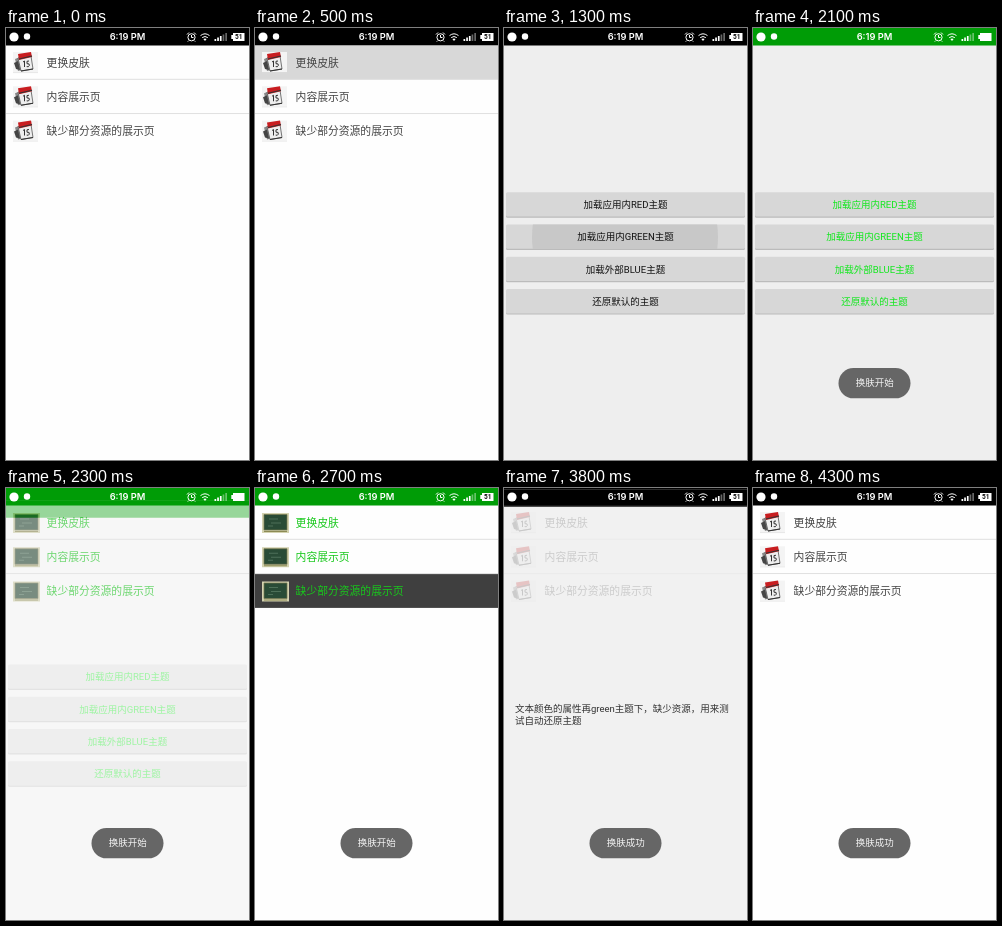
An HTML page for the animation above (4.5 s loop, 243 by 432 pixels).

```html
<!DOCTYPE html>
<html lang="zh-CN">
<head>
<meta charset="utf-8">
<title>换肤演示</title>
<style>
  html, body { margin: 0; width: 100%; height: 100%; overflow: hidden; background: #fff; }
  svg { display: block; width: 100vw; height: 100vh; }
  text { font-family: Roboto, "Noto Sans CJK SC", "Noto Sans CJK", sans-serif; font-size: 9.5px; }
  .mid { text-anchor: middle; }
  .bar { fill: #000; }
  .green .bar { fill: #009c06; }
  #list text { font-size: 10.8px; fill: #444; }
  #list.green text { fill: #18c81c; }
  #buttons text { fill: #111; }
  #buttons.green text { fill: #10e81c; }
  .pressed { fill: #d8d8d8; }
  .green .pressed { fill: #3f3f3f; }
  .board, .green .calendar { display: none; }
  .green .board { display: inline; }
  #clock { font: 600 9.3px Inter, Roboto, sans-serif; fill: #fff; }
  #level { font: 700 6.5px Roboto, sans-serif; fill: #111; }
</style>
</head>
<body>
<svg viewBox="0 0 243 432" preserveAspectRatio="none">
  <defs>
    <g id="calendar">
      <path d="M7 24h25v20H7z" fill="#f4f4f4"/>
      <path d="M7 44.6h25" stroke="#ddd" stroke-width=".7"/>
      <path d="M9 31l5-2 2 13-4 1z" fill="#888"/>
      <path d="M8 35l4-2 2 9-4-1z" fill="#444"/>
      <path d="M12 30l13-2 2 13-12 2z" fill="#eee" stroke="#555" stroke-width=".8"/>
      <path d="M12 26l13-2 1 5-13 3z" fill="#c81d20"/>
      <path d="M13 31l13-3M15 43l12-2" stroke="#333" stroke-width="1.2"/>
      <path d="M17 34l1.5-1v6M23 33l-2 .3v2.4q3-.5 2.3 2-.7 1.6-2.6.9" fill="none" stroke="#333"/>
    </g>
    <g id="board">
      <path d="M7 25h27v20H7z" fill="#d3d2b0"/>
      <path d="M9 26.5h23v15.5H9z" fill="#294b36" stroke="#73764c" stroke-width=".7"/>
      <path d="M14 31h9M16 35h10M13 38h5" stroke="#5d8067" stroke-width=".7"/>
      <path d="M9 43.5h23" stroke="#8d8b55"/>
    </g>
    <clipPath id="button-clip"><rect x="2" y="196.5" width="239" height="24.5" rx="1.5"/></clipPath>
  </defs>

  <g id="list"><rect width="243" height="432" fill="#fefefe"/><rect class="bar" width="243" height="17.5"/></g>
  <g id="buttons"><rect width="243" height="432" fill="#eee"/><rect class="bar" width="243" height="17.5"/></g>
  <g id="content">
    <rect width="243" height="432" fill="#eee"/><rect class="bar" width="243" height="17.5"/>
    <text x="11" y="223">文本颜色的属性再green主题下，缺少资源，用来测</text>
    <text x="11" y="234.3">试自动还原主题</text>
  </g>

  <g id="status" fill="#fff">
    <circle cx="8" cy="9" r="4.6"/>
    <circle cx="21" cy="8.5" r="3.2"/>
    <text id="clock" class="mid" x="121.5" y="12.4">6:19 PM</text>
    <g fill="none" stroke="#fff">
      <circle cx="185.5" cy="9.3" r="3.6"/>
      <path d="M185.5 7v2.5h2M181 6.5l2-2M190 6.5l-2-2M182.8 12.6l-1 1M188.2 12.6l1 1"/>
      <path d="M194.5 7.6q4.5-3.6 9 0M196.2 9.6q2.8-2.2 5.6 0"/>
    </g>
    <path d="M197.4 11q1.6-1.2 3.2 0l-1.6 2z"/>
    <path d="M208.5 11h1.7v2h-1.7zM211.2 9.5h1.7v3.5h-1.7zM213.9 8h1.7v5h-1.7z"/>
    <path d="M216.6 6.4h1.7v6.6h-1.7zM219.3 5h1.7v8h-1.7z" opacity=".4"/>
    <path d="M227 5h11.5v8H227v-2h-1.7V7H227z"/>
    <text id="level" class="mid" x="232.8" y="11.4">51</text>
  </g>

  <g id="toast">
    <rect x="85.5" y="340" width="72" height="30.3" rx="15.1" fill="#666"/>
    <text id="message" class="mid" x="121.8" y="357.8" fill="#f5f5f5"></text>
  </g>
</svg>
<script>
const LOOP = 4500, STEP = 100, SLIDE = 34;
const $ = id => document.getElementById(id);
const between = (t, a, b) => t >= a && t < b;
const clamp = v => Math.max(0, Math.min(1, v));

const rows = ['更换皮肤', '内容展示页', '缺少部分资源的展示页'];
$('list').insertAdjacentHTML('beforeend', rows.map((label, i) => `
  <g transform="translate(0 ${i * 34.25})">
    <rect id="row${i}" class="pressed" y="17.6" width="243" height="33.8"/>
    <use class="calendar" href="#calendar"/><use class="board" href="#board"/>
    <text x="40.6" y="38.5">${label}</text>
    ${i < 2 ? '<path d="M0 51.3h243" stroke="#ddd" stroke-width=".9"/>' : ''}
  </g>`).join(''));

const buttons = ['加载应用内RED主题', '加载应用内GREEN主题', '加载外部BLUE主题', '还原默认的主题'];
const ripple = '<circle id="ripple" cx="121" cy="209" fill="#c8c8c8" clip-path="url(#button-clip)"/>';
$('buttons').insertAdjacentHTML('beforeend', buttons.map((label, i) => {
  const y = 164.2 + i * 32.3;
  return `<rect x="2" y="${y + 1}" width="239" height="24.5" rx="1.5" fill="#bbb"/>
    <rect x="2" y="${y}" width="239" height="24.3" rx="1.5" fill="#d7d7d7"/>
    ${i === 1 ? ripple : ''}
    <text class="mid" x="121.5" y="${y + 15.8}">${label}</text>`;
}).join(''));

const show = (id, opacity) => $(id).setAttribute('opacity', opacity);

// A page rises while fading in, then drops while fading out.
function placePage(id, t, open, close) {
  const rise = clamp((t - open) / 350), drop = clamp((t - close) / 250);
  const y = SLIDE * ((1 - rise) ** 2.4 + drop ** 2);
  $(id).setAttribute('transform', `translate(0 ${y})`);
  show(id, clamp((t - open) / 170) * (1 - drop));
}

function draw(t) {
  $('list').classList.toggle('green', between(t, 1500, 3200));
  $('buttons').classList.toggle('green', t >= 1500);
  show('row0', +between(t, 500, 700));
  show('row1', 0);
  show('row2', +between(t, 2600, 3200));
  placePage('buttons', t, 650, 2150);
  placePage('content', t, 2850, 3750);

  $('ripple').setAttribute('r', Math.max(0, (t - 1100) * .465));
  show('ripple', t < 1200 ? 0 : clamp((1700 - t) / 300));
  show('level', +!(between(t, 1800, 2400) || between(t, 3000, 3600)));

  const success = t >= 3700;
  $('message').textContent = success ? '换肤成功' : '换肤开始';
  show('toast', success ? clamp((t - 3640) / 100) : clamp((t - 1440) / 100) * clamp((3640 - t) / 100));
}

function tick(now) {
  draw(Math.floor(now % LOOP / STEP) * STEP);
  requestAnimationFrame(tick);
}
draw(0);
requestAnimationFrame(tick);
</script>
</body>
</html>
```
